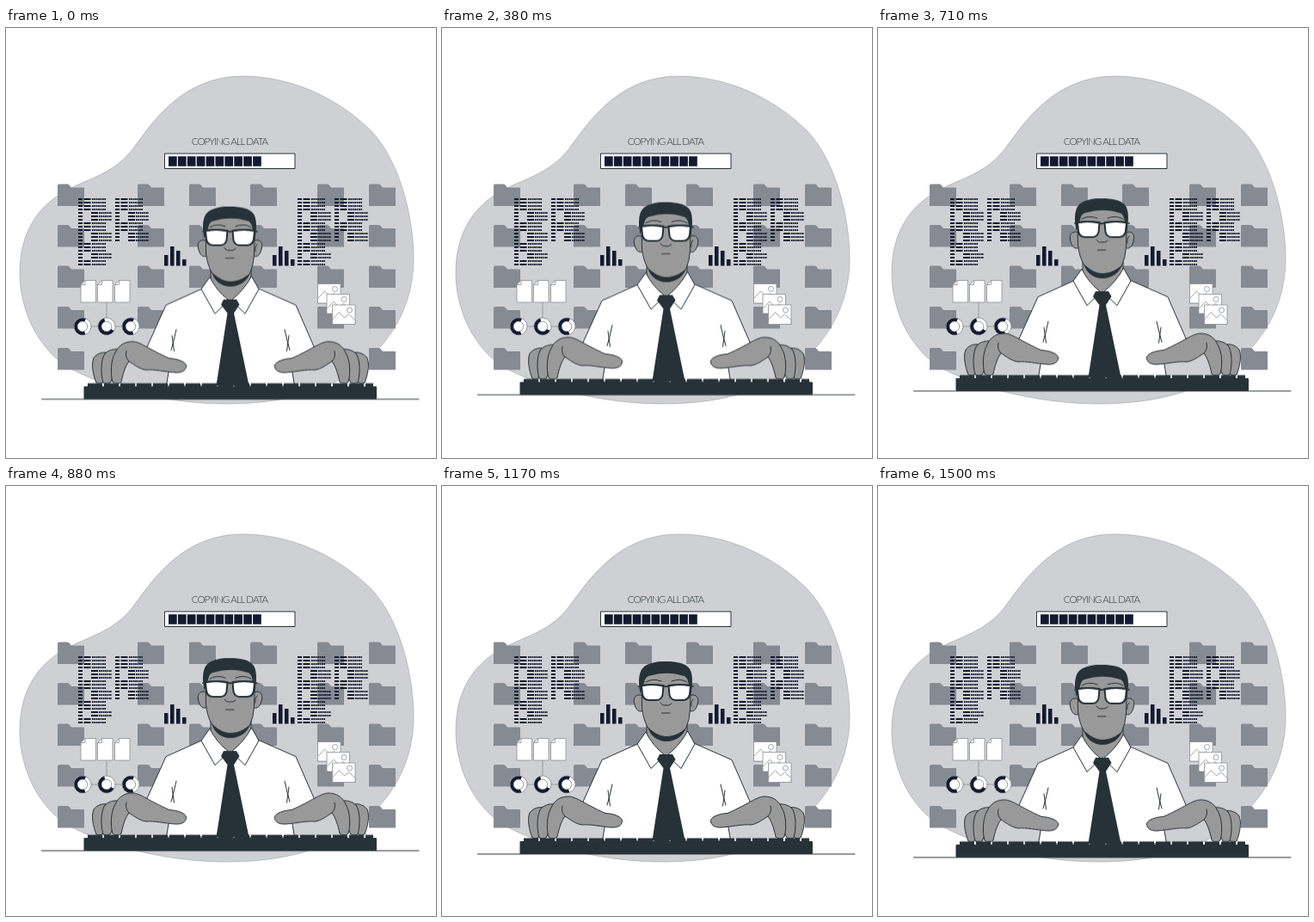
These frames come from a looping animation (500x500 px, 1.54 s). An HTML page without scripts:

```html
<!DOCTYPE html>
<html lang="en">
<head>
<meta charset="utf-8">
<title>Copying all data</title>
<style>
  html, body { margin: 0; width: 100%; height: 100%; overflow: hidden; background: #fff; }
  svg { display: block; width: 100%; height: 100%; }
  .title { font: 300 11.5px Lato, sans-serif; letter-spacing: -.95px; text-anchor: middle; fill: #263238; }
  .ink { fill: #263238; }
  .navy { fill: #131a30; }
  .line { fill: none; stroke: #263238; stroke-width: 1; stroke-linecap: round; stroke-linejoin: round; }
  .skin { fill: #999; stroke: #263238; stroke-width: 1; stroke-linejoin: round; }
  .cloth { fill: #fff; stroke: #263238; stroke-width: 1; stroke-linejoin: round; }
  .paper { fill: #fff; stroke: #8b8e94; stroke-width: .8; stroke-linejoin: round; }
  .bars { fill: none; stroke: #131a30; stroke-width: 1.8; }
  .dots { stroke-dasharray: 1.7 .7; }
  .float { animation: float 1540ms linear infinite; }
  @keyframes float {
    0%, 100% { transform: translateY(-.4px); }
    46.8% { transform: translateY(-10px); }
    96% { transform: translateY(0); }
  }
</style>
</head>
<body>
<svg viewBox="0 0 500 500">
  <defs>
    <path id="folder" fill="#858a93" d="M0 1.500Q0 0 1.500 0H11.500Q13 0 14 1.500L16 4H30Q31 4 31 5V25.500H0Z"/>
    <g id="folderPair"><use href="#folder"/><use href="#folder" x="362"/></g>
    <g id="folderQuad"><use href="#folderPair"/><use href="#folder" x="93"/><use href="#folder" x="302"/></g>
    <g id="folderRow"><use href="#folderQuad"/><use href="#folder" x="153"/><use href="#folder" x="224"/></g>

    <g id="left" class="bars"><path d="M0 0h5m1.500 0h8"/><path class="dots" d="M16 0h16"/></g>
    <g id="right" class="bars"><path d="M0 0h5m10 0h8"/><path class="dots" d="M24 0h15"/></g>
    <g id="leftRows"><use href="#left"/><use href="#left" y="4"/><use href="#left" y="8"/></g>
    <g id="rightRows"><use href="#right"/><use href="#right" y="4"/><use href="#right" y="8"/></g>
    <g id="code">
      <use href="#leftRows"/><use href="#left" y="12"/>
      <use href="#rightRows" y="16"/>
      <use href="#leftRows" y="28"/>
      <use href="#rightRows" y="40"/>
    </g>
    <g id="codeBlock">
      <use href="#code"/><use href="#code" x="43"/>
      <use href="#leftRows" y="52"/>
      <use href="#right" y="64"/><use href="#right" y="68"/>
      <use href="#left" y="72"/><use href="#left" y="76"/>
    </g>

    <path id="chart" class="navy" d="M0 10h4.500v12.500H0ZM7 0h4.500v22.500H7ZM14 5h4.500v17.500H14ZM21 15h4.500v7.500H21Z"/>
    <g id="page" class="paper"><path d="M5 0H17.500V25.500H0V5Z"/><path d="M5 0V5H0Z"/></g>
    <g id="donut">
      <circle class="paper" r="10"/>
      <circle r="7.800" fill="none" stroke="#131a30" stroke-width="4" pathLength="100" stroke-dasharray="62 38"/>
      <circle class="paper" r="5.800"/>
    </g>
    <g id="photo" class="paper">
      <path d="M0 0H26.500V22.500H0Z"/>
      <path d="M0 17L8 8.500L14 15L19 11L26.500 17.500V22.500H0Z"/>
      <circle cx="20" cy="6" r="3"/>
    </g>

    <g id="hand" class="skin">
      <path d="M105 413C101 403 99 391 102 384C106 378 115 376 121 379L119 400L112 413Q108 415 105 413Z"/>
      <path d="M113 413C110 402 110 386 115 379C121 373 130 373 135 375L128 398L121 413Q117 415 113 413Z"/>
      <path d="M124 412C121 402 122 386 127 378C131 369 138 365 147 365C156 365 166 374 190 384.500C199 385 208 388 209.500 392.500C210 398 205 401.500 197 401C184 400 172 397 163 398C155 397 148 391 143 388C139 393 136 402 134 412Q129 416 124 412Z"/>
      <path class="line" d="M143 388Q138 383 140 376"/>
    </g>
    <path id="sleeve" class="line" d="M198 351Q195 365 192 375M193 358L195.500 376"/>
    <path id="lens" fill="#fff" stroke="#263238" stroke-width="2" d="M232 236Q244 234 257.500 236L256.500 247Q255 253 249 253H241Q234 253 233 246Z"/>
  </defs>

  <path fill="#cfd0d4" stroke="#919297" stroke-width=".5" d="M275 56C330 56 385 80 425 120C458 155 474 220 474 268C474 330 440 385 372 417C335 432 295 437 256 437C190 437 120 420 75 396C35 373 16 325 16 285C16 240 35 208 70 189C95 175 125 170 148 140C170 110 205 56 275 56Z"/>

  <use href="#folderRow" x="60" y="181.500"/>
  <use href="#folderRow" x="60" y="229"/>
  <use href="#folderRow" x="60" y="276.500"/>
  <use href="#folderQuad" x="60" y="324"/>
  <use href="#folderPair" x="60" y="372"/>

  <text class="title" x="260" y="136">COPYING ALL DATA</text>
  <rect class="cloth" x="184.500" y="146" width="151.500" height="17.500"/>
  <path fill="none" stroke="#131a30" stroke-width="11.500" stroke-dasharray="9.700 1.200" d="M189 155H298"/>

  <use href="#codeBlock" x="84" y="199"/>
  <use href="#codeBlock" x="339" y="199"/>
  <use href="#chart" x="184" y="254"/>
  <use href="#chart" x="310" y="254"/>

  <path fill="none" stroke="#8b8e94" stroke-width=".8" d="M117 319V337M79 347H155"/>
  <use href="#page" x="87" y="293.500"/>
  <use href="#page" x="106.500" y="293.500"/>
  <use href="#page" x="126.500" y="293.500"/>
  <use href="#donut" transform="translate(89 347) rotate(70)"/>
  <use href="#donut" transform="translate(117 347) rotate(30)"/>
  <use href="#donut" transform="translate(145 347) rotate(70)"/>
  <use href="#photo" x="362.500" y="297.500"/>
  <use href="#photo" x="373" y="309.500"/>
  <use href="#photo" x="379.500" y="322"/>

  <g class="float">
    <path class="cloth" d="M236 300L186 322.500L160 380L190 395L186.500 416H335.500L332 395L362 380L337 322.500L286 300Z"/>
    <use href="#sleeve"/>
    <use href="#sleeve" transform="matrix(-1 0 0 1 522 0)"/>

    <path class="skin" d="M238 276V297L260.500 320L285 297V276Z"/>
    <path class="ink" d="M239 284C247 292 254 295.500 261 295.500C269 295.500 277 292 284 285C281 294 272 301 261 301C250 301 242 294 239 284Z"/>
    <path class="cloth" d="M237 290L227 304L243 332.500L259 317Q244 305 237 290Z"/>
    <path class="cloth" d="M285.500 289L294 304L278 332.500L262 317Q277 305 285.500 289Z"/>
    <path class="ink" d="M253 316H268L271.500 322L265 332L282.500 416H244.500L257.500 332L250 322Z"/>

    <path class="skin" d="M233 248C227 245 222 249 223.500 256C225 264 229 268 234 265Z"/>
    <path class="skin" d="M288 248C294 245 299 249 297.500 256C296 264 292 268 287 265Z"/>
    <path class="skin" d="M232 228L232.500 262Q234 276 239.500 285C247 292 254 295.500 261 295.500C269 295.500 277 292 283.500 286Q288 276 288.500 264L289.500 228Q261 212 232 228Z"/>
    <path class="ink" d="M230.500 245C227.500 230 229 219 235 214C242 209 252 207.500 261 208C272 208 283 210 287.500 216C292 222 291.500 234 289.500 246L287 236Q286 227 282 225C268 220.500 255 220.500 240 225Q235 227 234 238Z"/>
    <path class="line" d="M237 232Q245 227 255 231M267 231Q277 227 285 232"/>
    <path class="line" d="M254 256Q256 260 260 259Q264 260 267 257M255.500 268H265M292 252Q289 255 290 260"/>
    <use href="#lens"/>
    <use href="#lens" transform="matrix(-1 0 0 1 521 0)"/>
    <path class="line" style="stroke-width:1.800" d="M229 237L233 236Q245 234 257 236.500Q260.500 238 264 236.500Q276 234 288 236L292 237"/>

    <use href="#hand"/>
    <use href="#hand" transform="matrix(-1 0 0 1 522 0)"/>

    <path fill="none" stroke="#263238" stroke-width="4" stroke-dasharray="17 2" d="M95 415.500H427"/>
    <rect class="ink" x="90.500" y="417" width="340.500" height="15" rx="1"/>
    <path class="line" d="M41.500 432H480"/>
  </g>
</svg>
</body>
</html>
```
